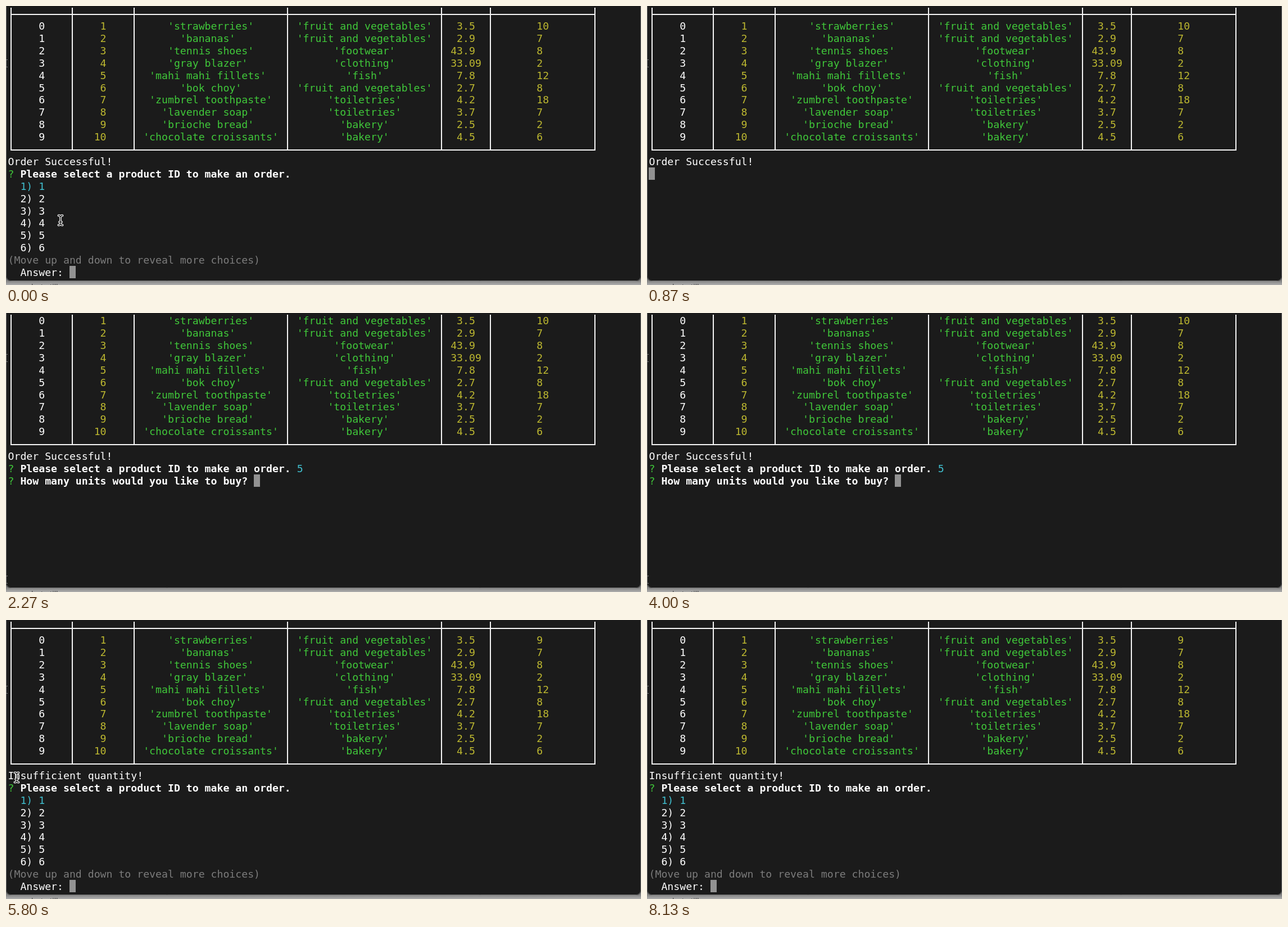
An HTML page with a canvas for the animation above (8.74 s loop, 1130 by 496 pixels).

```html
<!DOCTYPE html>
<html lang="en">
<head>
<meta charset="utf-8">
<title>Terminal order</title>
<style>
  html, body { margin: 0; width: 100%; height: 100%; overflow: hidden; background: #1b1b1b; }
  canvas { display: block; }
</style>
</head>
<body>
<canvas id="stage" width="1130" height="496"></canvas>
<script>
const ctx = document.getElementById('stage').getContext('2d');
const LOOP = 8740, TICK = 200 / 3;
const CELL = 10.94, ROW = 21.9, LEFT = 3.5, TOP = 25;
const FONT = '18.19px "DejaVu Sans Mono", monospace';
const WHITE = '#fff', GREEN = '#40c83a', YELLOW = '#bdb830', CYAN = '#40c0d0';
const GRAY = '#7c7c7c', BLOCK = '#929292', BACK = '#1b1b1b';

const EDGES = [0, 10, 20, 45, 70, 78, 95];
const COLORS = [WHITE, YELLOW, GREEN, GREEN, YELLOW, YELLOW];
const PRODUCTS = [
  ['strawberries', 'fruit and vegetables', '3.5', '10'],
  ['bananas', 'fruit and vegetables', '2.9', '7'],
  ['tennis shoes', 'footwear', '43.9', '8'],
  ['gray blazer', 'clothing', '33.09', '2'],
  ['mahi mahi fillets', 'fish', '7.8', '12'],
  ['bok choy', 'fruit and vegetables', '2.7', '8'],
  ['zumbrel toothpaste', 'toiletries', '4.2', '18'],
  ['lavender soap', 'toiletries', '3.7', '7'],
  ['brioche bread', 'bakery', '2.5', '2'],
  ['chocolate croissants', 'bakery', '4.5', '6']
];

// Each entry holds from its start time until the next one.
// pick: highlighted choice, typed: answer text, at: cursor column
const STEPS = [
  { start: 0, pick: 1, typed: '', at: 10 },
  { start: 70, blank: true },
  { start: 130, pick: 2, typed: '2', at: 11 },
  { start: 470, pick: 3, typed: '3', at: 10 },
  { start: 530, pick: 3, typed: '3', at: 11 },
  { start: 670, pick: 4, typed: '4', at: 10 },
  { start: 730, pick: 4, typed: '4', at: 11 },
  { start: 870, blank: true },
  { start: 930, up: 1, pick: 5, typed: '5', at: 10 },
  { start: 1000, up: 1, pick: 5, typed: '5', at: 11 },
  { start: 2000, up: 1, chosen: true },
  { start: 2070, up: 1, chosen: true, units: '' },
  { start: 4070, up: 1, chosen: true, units: '2' },
  { start: 4200, up: 1, chosen: true, units: '20' },
  { start: 4670, up: 1, chosen: true, units: '20', sent: true },
  { start: 4730, again: true, pick: 1, typed: '', at: 10 }
];

// Pointer path: time, x, y
const PATH = [
  [5267, 183, 342], [5467, 70, 306], [5667, 11, 286], [5800, 19, 280],
  [5933, 50, 276], [6133, 125, 273], [6333, 215, 269], [6533, 266, 267],
  [6667, 267, 267], [6733, 268, 267], [7300, 268, 267]
];

const colX = c => LEFT + c * CELL;
const rowY = r => TOP + r * ROW;

function write(text, col, row, color = WHITE, bold = false) {
  ctx.font = (bold ? 'bold ' : '') + FONT;
  ctx.fillStyle = color;
  const y = Math.round(rowY(row) + 17);
  [...text].forEach((ch, i) => ctx.fillText(ch, colX(col + i), y));
}

function block(col, row) {
  ctx.fillStyle = BLOCK;
  ctx.fillRect(Math.floor(colX(col) + 0.2), Math.round(rowY(row) - 1), 11, 22);
}

function table(up, again) {
  const mid = c => Math.round(colX(c + 0.5));
  const ruleY = r => Math.round(rowY(r) + 11.5);
  const bottom = ruleY(10 - up);
  ctx.fillStyle = '#f4f4f4';
  for (const e of EDGES) ctx.fillRect(mid(e) - 1, 3, 2, bottom - 3);
  const rules = up ? [bottom] : [ruleY(-1), bottom];
  for (const y of rules) ctx.fillRect(mid(0) - 1, y - 1, mid(95) - mid(0) + 2, 2);

  PRODUCTS.forEach(([name, kind, price, stock], i) => {
    const left = again && i === 0 ? '9' : stock;
    const cells = [`${i}`, `${i + 1}`, `'${name}'`, `'${kind}'`, price, left];
    cells.forEach((text, c) => {
      const room = EDGES[c + 1] - EDGES[c] - 1;
      const col = EDGES[c] + 1 + Math.floor((room - text.length) / 2);
      write(text, col, i - up, COLORS[c]);
    });
  });
}

function question(text, row) {
  write('?', 0, row, GREEN);
  write(text, 2, row, WHITE, true);
}

function choices(s, up) {
  for (let n = 1; n <= 6 + up; n++) {
    write(`${n}) ${n}`, 2, 12 - up + n, n === s.pick ? CYAN : WHITE);
  }
  write('(Move up and down to reveal more choices)', 0, 19, GRAY);
  write('Answer:', 2, 20);
  block(s.at, 20);
  write(s.typed, 10, 20);
}

function unitPrompt(s) {
  question('How many units would you like to buy?', 12);
  if (s.sent) block(0, 13);
  else block(40 + s.units.length, 12);
  write(s.units, 40, 12, s.sent ? CYAN : WHITE);
}

function mark(row) {
  const y = Math.round(rowY(row) + 4);
  ctx.fillStyle = '#858585';
  ctx.fillRect(0, y, 1, 14);
  ctx.fillRect(0, y, 3, 1);
  ctx.fillRect(0, y + 13, 3, 1);
}

function pointer(x, y) {
  ctx.beginPath();
  for (const d of [-1, 1]) {
    ctx.moveTo(x - 3.5, y + 8.5 * d);
    ctx.quadraticCurveTo(x, y + 8.5 * d, x, y + 5.5 * d);
    ctx.quadraticCurveTo(x, y + 8.5 * d, x + 3.5, y + 8.5 * d);
  }
  ctx.moveTo(x, y - 6);
  ctx.lineTo(x, y + 6);
  ctx.moveTo(x - 2, y + 3);
  ctx.lineTo(x + 2, y + 3);
  ctx.lineCap = 'round';
  for (const [color, width] of [['#f8f8f8', 3.8], ['#111', 1.3]]) {
    ctx.strokeStyle = color;
    ctx.lineWidth = width;
    ctx.stroke();
  }
}

function pointerAt(t) {
  if (t < 70) return [97, 381];
  if (t >= 7330 && t < 7400) return [501, 86];
  if (t < 5267 || t >= 7400) return null;
  const now = Math.floor((t + 4) / TICK) * TICK;
  const i = PATH.findIndex(p => p[0] > now);
  if (i < 0) return PATH[PATH.length - 1].slice(1);
  if (i === 0) return PATH[0].slice(1);
  const [a, b] = [PATH[i - 1], PATH[i]];
  const k = (now - a[0]) / (b[0] - a[0]);
  return [a[1] + (b[1] - a[1]) * k, a[2] + (b[2] - a[2]) * k];
}

function desktop() {
  const shade = ctx.createLinearGradient(0, 488, 0, 496);
  shade.addColorStop(0, '#808080');
  shade.addColorStop(1, '#adadad');
  ctx.fillStyle = shade;
  ctx.fillRect(0, 480, 1130, 16);
  ctx.font = '14px Inter, sans-serif';
  ctx.fillStyle = '#444';
  ctx.fillText('but still', 45, 505);
}

function shell() {
  ctx.beginPath();
  ctx.roundRect(0, -20, 1130, 509, 8);
  ctx.fillStyle = BACK;
  ctx.fill();
  ctx.strokeStyle = '#6a6a6a';
  ctx.lineWidth = 1;
  ctx.beginPath();
  ctx.roundRect(0.5, -20, 1129, 508.5, 8);
  ctx.stroke();
}

function draw(t) {
  const s = STEPS.findLast(step => step.start <= t);
  const up = s.up || 0;
  desktop();
  shell();
  table(up, s.again);
  write(s.again ? 'Insufficient quantity!' : 'Order Successful!', 0, 11 - up);
  mark(s.again ? 4 : 3 - up);

  if (s.blank) {
    block(0, 12);
  } else {
    question('Please select a product ID to make an order.', 12 - up);
    if (s.pick) choices(s, up);
  }
  if (s.chosen) {
    write('5', 47, 11, CYAN);
    mark(20);
    if (s.units === undefined) block(0, 12);
    else unitPrompt(s);
  }

  const spot = pointerAt(t);
  if (spot) pointer(...spot);
}

const begin = performance.now();
function frame() {
  draw((performance.now() - begin) % LOOP);
  requestAnimationFrame(frame);
}
frame();
</script>
</body>
</html>
```
